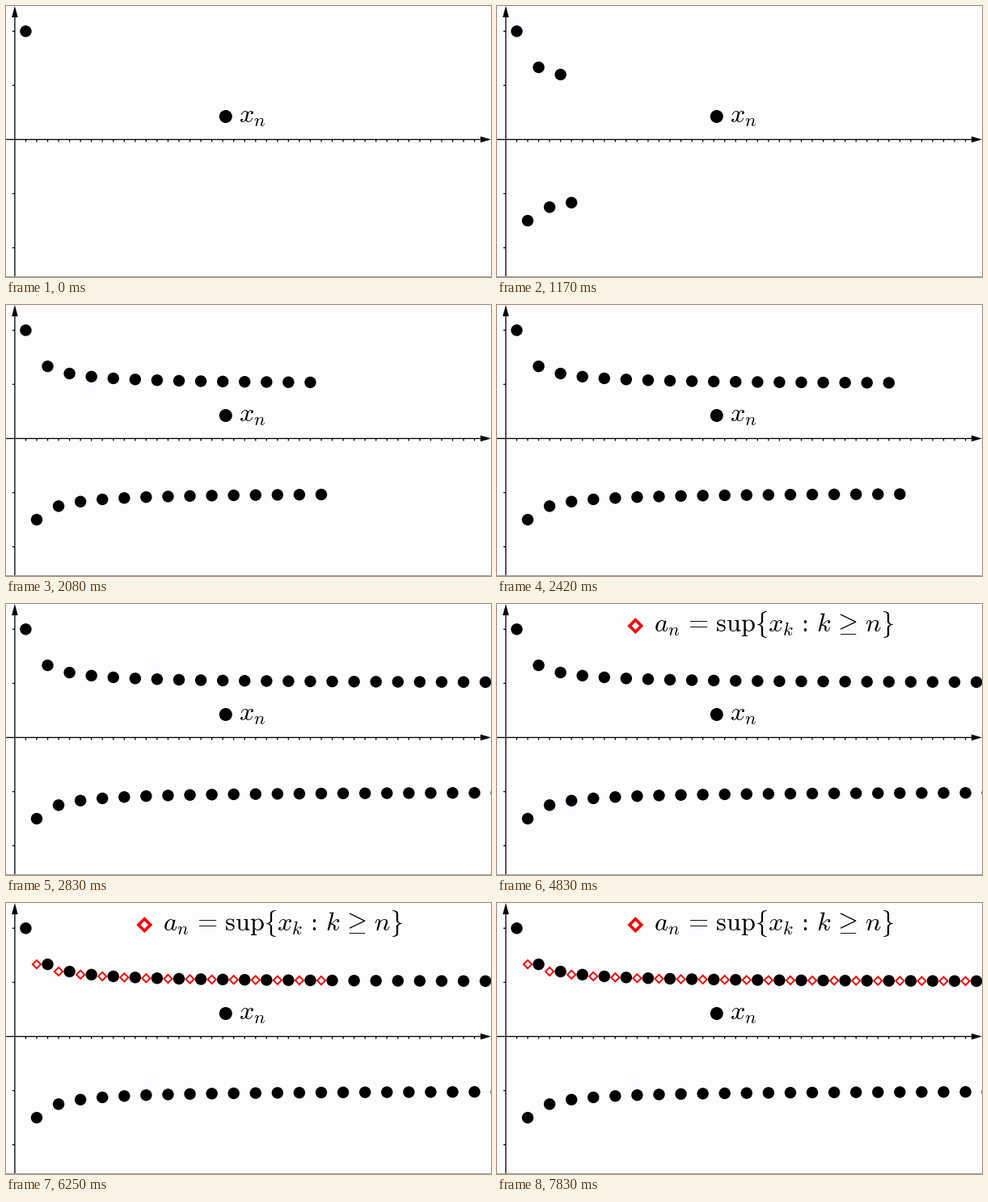
Recreate the animation shown at these times as a matplotlib script. Size 600x336 px, loop 8000 ms.

```python
import matplotlib.pyplot as plt
import numpy as np
from matplotlib.animation import FuncAnimation
from matplotlib.patches import Circle, Polygon

W, H, DPI = 600, 336, 96
PX = 72 / DPI                      # points per pixel
LOOP, INTERVAL = 8000, 20
X0, Y0 = 10.9, 165.5               # axes crossing
DX, UNIT = 13.54, 67.1
COUNT = 44
RED = "#f20a0a"
PAPER = "#fdfcff"

plt.rcParams["mathtext.fontset"] = "cm"

# How many terms are shown, as (twelfth of a second, count)
X_KEYS = [(0, 1), (8, 2), (10, 3), (12, 4), (14, 6), (21, 20), (22, 20),
          (23, 24), (25, 28), (30, 38), (31, 39), (33, 43), (34, 44)]
A_START = 58
A_KEYS = [(58, 1), (60, 2), (62, 4), (71, 22), (72, 22), (75, 28),
          (80, 38), (81, 39), (83, 43), (84, 44)]

fig = plt.figure(figsize=(W / DPI, H / DPI), dpi=DPI, facecolor=PAPER)
ax = fig.add_axes([0, 0, 1, 1])
ax.set_xlim(0, W)
ax.set_ylim(H, 0)
ax.axis("off")


def x_term(n):
    return (-1) ** (n + 1) * (1 + 1 / n)


def a_term(n):
    return x_term(n if n % 2 else n + 1)    # sup sits at an odd index


def place(n, value):
    return X0 + DX * n, Y0 - UNIT * value


def dot(x, y, radius):
    return ax.add_patch(Circle((x, y), radius, color="black", lw=0, zorder=3))


def diamond(x, y, half, width):
    corners = [(x - half, y), (x, y - half), (x + half, y), (x, y + half)]
    return ax.add_patch(Polygon(corners, fc="white", ec=RED, lw=width * PX,
                                joinstyle="miter", zorder=2))


def label(x, y, tex):
    return ax.text(x, y, tex, fontsize=32.3 * PX, va="baseline", ha="left")


def draw_axes():
    style = dict(colors="black", lw=1.3 * PX, snap=False, zorder=1)
    ticks = X0 + DX * np.arange(1, 43)
    marks = Y0 - UNIT * np.array([-2, -1, 1, 2])
    ax.hlines(Y0, 0, W - 8, **style)
    ax.vlines(X0, 8, H, **style)
    ax.vlines(ticks, Y0, Y0 + 3, **style)
    ax.hlines(marks, X0 - 3, X0, **style)
    heads = ([(X0, 0), (X0 - 3.8, 14), (X0 + 3.8, 14)],
             [(W, Y0), (W - 13, Y0 - 3.8), (W - 13, Y0 + 3.8)])
    for head in heads:
        ax.add_patch(Polygon(head, color="black", lw=0, zorder=1))
    ax.hlines(H - .5, 0, W, colors="#a0a0a0", lw=PX, snap=False, zorder=1)


draw_axes()
indices = range(1, COUNT + 1)
x_dots = [dot(*place(n, x_term(n)), 7.2) for n in indices]
a_marks = [diamond(*place(n, a_term(n)), 5.1, 2) for n in indices]

dot(271.8, 137, 8)
label(288.5, 144.4, r"$x_n$")

GAP = r"\hspace{0.13}"
# The calligraphic font holds the text-size braces at f and g
LEFT, RIGHT = r"\mathcal{f}", r"\mathcal{g}"


def rel(symbol):
    return GAP + symbol + GAP


a_key = [
    diamond(171.3, 27.1, 7.4, 3.7),
    label(194.3, 33.8, r"$a_n" + rel("=") + r"\mathrm{sup}" + LEFT + "x_k"
          + rel(":") + "k" + rel(r"\geq") + "n" + RIGHT + "$"),
]


def shown(keys, step):
    return int(np.interp(step, *zip(*keys)) + 1e-6)


def reveal(parts, count):
    for i, part in enumerate(parts):
        part.set_visible(i < count)


def update(i):
    step = int((i + .5) * INTERVAL * .012 + .1)
    started = step >= A_START
    reveal(x_dots, shown(X_KEYS, step))
    reveal(a_marks, shown(A_KEYS, step) if started else 0)
    reveal(a_key, len(a_key) if started else 0)
    return [*x_dots, *a_marks, *a_key]


anim = FuncAnimation(fig, update, frames=LOOP // INTERVAL, interval=INTERVAL,
                     init_func=lambda: update(0), repeat=True,
                     repeat_delay=0)
plt.show()
```
